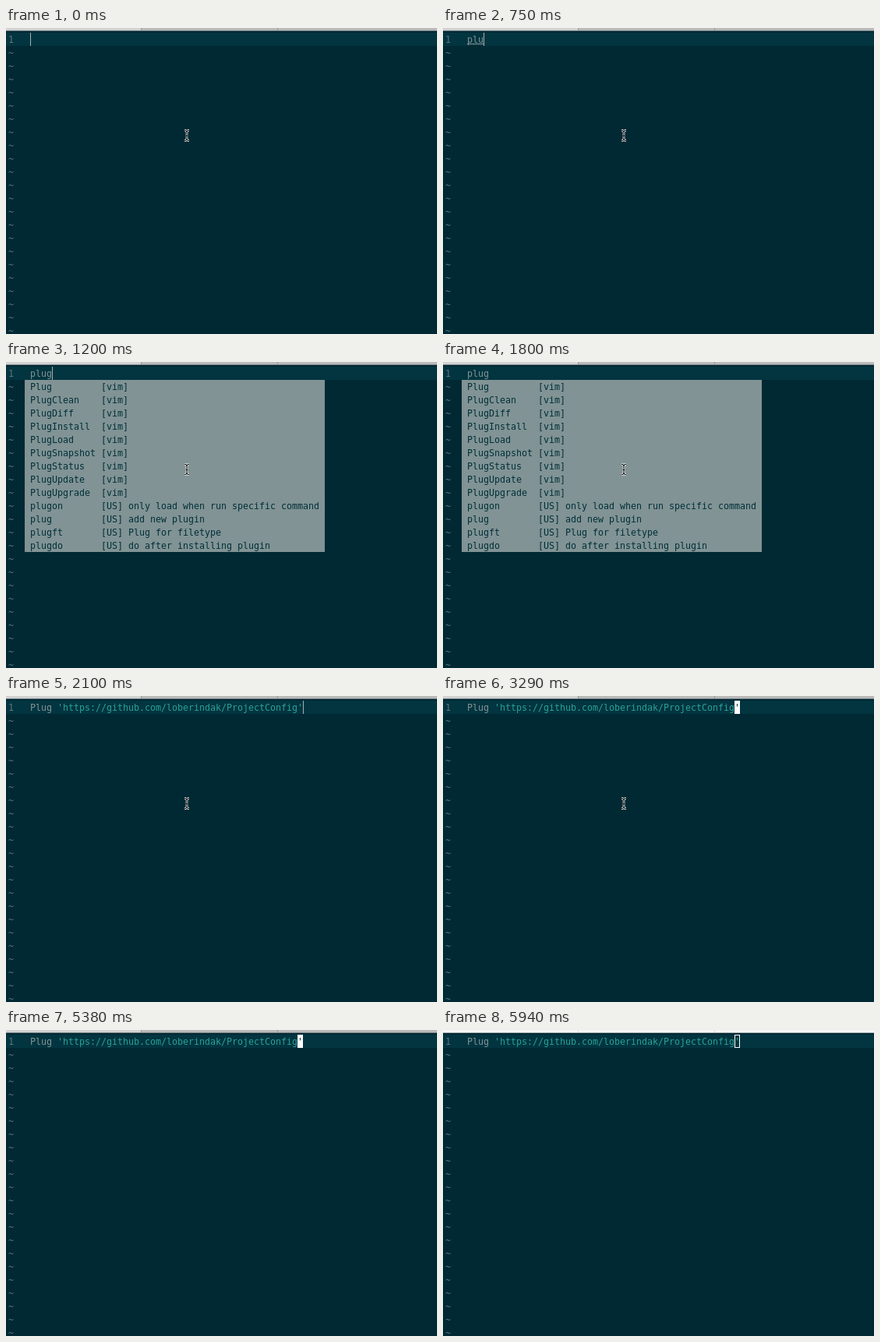
An HTML page that plays this animation: 553 by 393 pixels, repeating every 6.04 s.

```html
<!DOCTYPE html>
<html lang="en">
<head>
<meta charset="utf-8">
<title>Snippet completion in an editor</title>
<style>
html, body { margin: 0; width: 100%; height: 100%; overflow: hidden; background: #002934; }
svg { display: block; width: 100vw; height: 100vh; }
text { font: 11.63px "DejaVu Sans Mono", monospace; white-space: pre; }
</style>
</head>
<body>
<svg id="stage" viewBox="0 0 553 393"></svg>
<script>
const LOOP = 6040, CELL = 7, ROW = 17, TOP = 6, LEFT = 31;
const FG = '#839496', DIM = '#5d747b', BG = '#002934', STRING = '#2aa198';
const stage = document.getElementById('stage');

function add(tag, attrs, parent = stage) {
  const el = document.createElementNS('http://www.w3.org/2000/svg', tag);
  for (const k in attrs) el.setAttribute(k, attrs[k]);
  return parent.appendChild(el);
}
const rect = (x, y, width, height, fill, parent) =>
  add('rect', { x, y, width, height, fill }, parent);
const rowTop = row => TOP + row * ROW;
function label(x, row, fill, content, parent) {
  const el = add('text', { x, y: rowTop(row) + 13, fill }, parent);
  el.textContent = content;
  return el;
}
const show = (el, on) => el.setAttribute('visibility', on ? 'visible' : 'hidden');

// Editor background, tab strip, gutter
rect(0, 0, 553, 393, BG);
rect(0, TOP, 553, ROW, '#023540');
const tabs = [[0, 173], [174, 174], [349, 204]].map(([x, w]) => rect(x, 0, w, 3, '#bbb'));
const dividers = [173, 348].map(x => rect(x, 0, 1, 3, '#999'));
const tabEdge = rect(0, 3, 553, 1, '#7d8889');
label(3, 0, DIM, '1');
for (let row = 1; row < 23; row++) label(3, row, DIM, '~');

// Text line
const QUOTED = "'https://github.com/loberindak/ProjectConfig'";
const END = LEFT + 50 * CELL;
const typed = label(LEFT, 0, FG, '');
const underline = rect(LEFT, 20, 0, 1, FG);
const quoted = label(LEFT + 5 * CELL, 0, STRING, QUOTED);
const bar = rect(LEFT, TOP, 1, ROW, '#a3b1b1');
const block = add('g', {});
rect(END - CELL, TOP, CELL, ROW, '#fff', block);
label(END - CELL, 0, BG, "'", block);
const hollow = add('rect', {
  x: END - CELL + .5, y: TOP + .5, width: CELL - 1, height: ROW - 1,
  fill: 'none', stroke: '#fff'
});

// Completion menu
const entry = (name, kind, note = '') => name.padEnd(13) + `[${kind}] `.padEnd(5) + note;
const commands = ['', 'Clean', 'Diff', 'Install', 'Load', 'Snapshot', 'Status', 'Update', 'Upgrade']
  .map(s => entry('Plug' + s, 'vim'));
const snippets = [
  ['plugon', 'only load when run specific command'],
  ['plug', 'add new plugin'],
  ['plugft', 'Plug for filetype'],
  ['plugdo', 'do after installing plugin']
].map(([name, note]) => entry(name, 'US', note));

function menu(items) {
  const g = add('g', {});
  rect(24, rowTop(1), 55 * CELL, items.length * ROW, '#819394', g);
  items.forEach((item, i) => label(LEFT, i + 1, '#002f3a', item, g));
  return g;
}
const longMenu = menu([...commands, entry('plu', 'B'), ...snippets]);
const shortMenu = menu([...commands, ...snippets]);

// I-beam pointer
const beam = 'M1 1.3Q4 1.3 4 4.5V11.5Q4 14.7 1 14.7M7 1.3Q4 1.3 4 4.5M4 11.5Q4 14.7 7 14.7M2.8 8.5H5.2';
const pointer = add('g', { fill: 'none' });
add('path', { d: beam, stroke: '#fff', 'stroke-width': 2.6 }, pointer);
add('path', { d: beam, stroke: '#0a0a0a', 'stroke-width': 1.1 }, pointer);

// Each step: [start time, value]
const typing = [[0, ''], [450, 'p'], [600, 'pl'], [750, 'plu'], [1200, 'plug'], [2100, 'Plug']];
const moves = [[0, [228, 130]], [4940, [292, 191]], [5080, [408, 370]], [5230, [519, 359]], [5380, null]];
const at = (steps, t) => steps.filter(s => s[0] <= t).pop()[1];

function draw(t) {
  const word = at(typing, t), spot = at(moves, t);
  const done = t >= 2100, normal = t >= 3290, blurred = t >= 5940;

  typed.textContent = word;
  underline.setAttribute('width', t >= 600 && t < 1200 ? word.length * CELL : 0);
  show(quoted, done);
  bar.setAttribute('x', done ? END : LEFT + word.length * CELL);
  show(bar, !normal && !(t >= 1800 && t < 2100));
  show(block, normal && !blurred);
  show(hollow, blurred);

  show(longMenu, t >= 900 && t < 1200);
  show(shortMenu, t >= 1200 && !done);

  show(pointer, spot);
  if (spot) pointer.setAttribute('transform', `translate(${spot})`);

  tabs.forEach((tab, i) => tab.setAttribute('fill', blurred ? '#f6f6f6' : i ? '#bababa' : '#d3d3d3'));
  dividers.forEach(d => d.setAttribute('fill', blurred ? '#dcdcdc' : '#999'));
  tabEdge.setAttribute('fill', blurred ? '#a9b2b3' : '#7d8889');
}

const start = performance.now();
function tick() {
  draw((performance.now() - start) % LOOP);
  requestAnimationFrame(tick);
}
tick();
</script>
</body>
</html>
```
